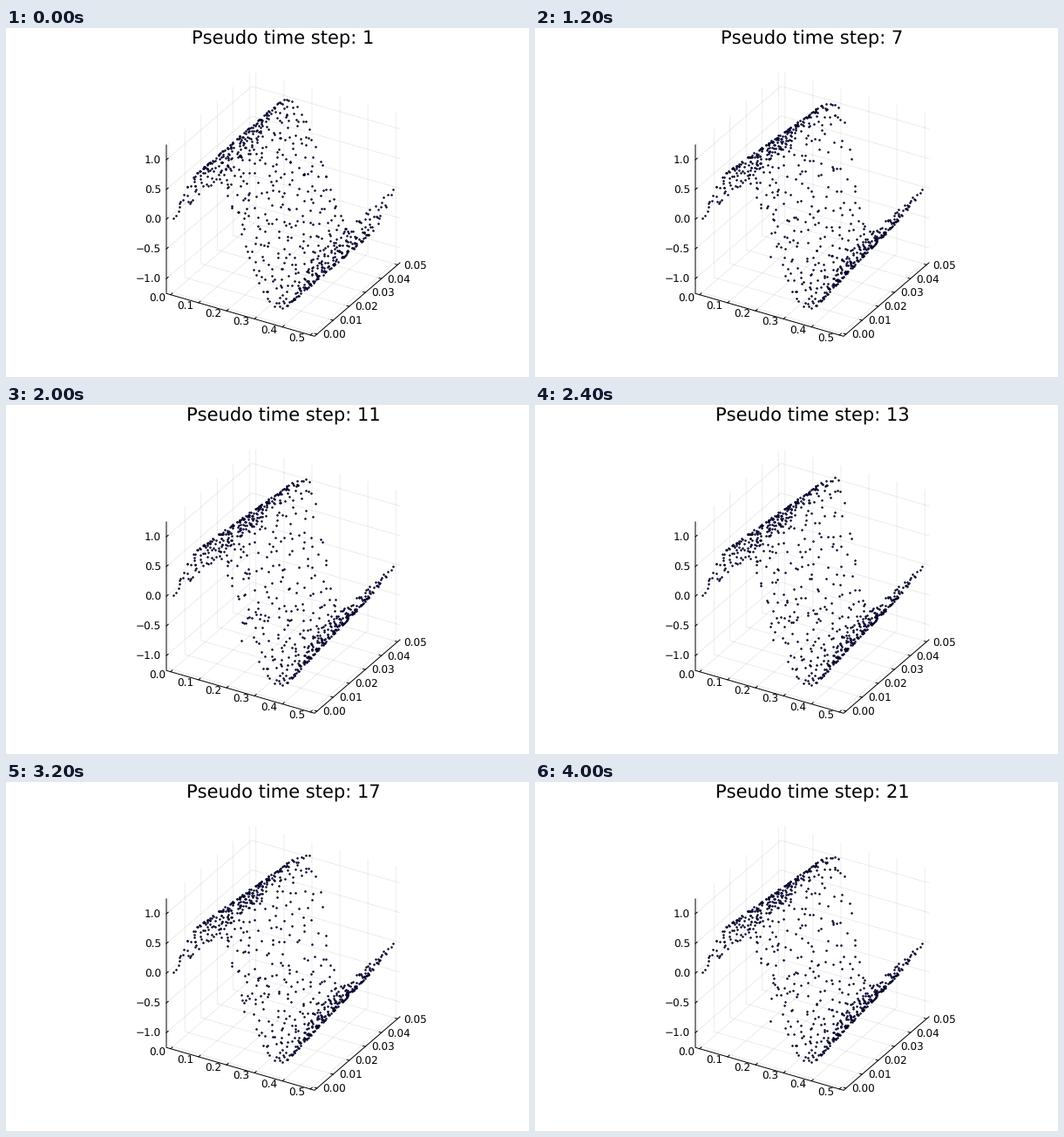
Write a matplotlib script that moves like this. It is 600 px wide and 400 px high and loops after 4200 ms.

```python
import numpy as np
import matplotlib.pyplot as plt
from matplotlib.animation import FuncAnimation

W, H, DPI = 600, 400, 100
PX = 72 / DPI
STEPS, INTERVAL = 21, 200
plt.rcParams["font.family"] = "DejaVu Sans"
plt.rcParams["text.hinting"] = "none"
plt.rcParams["text.hinting_factor"] = 1

X_LIM, T_LIM, U_LIM = (-0.015, 0.515), (-0.0015, 0.0515), (-1.25, 1.25)
ORIGIN = np.array([184.0, 304.3])
AXES = np.array([[170.0, 49.0], [98.0, -84.3], [0.0, -170.3]])


def project(x, t, u):
    """Orthographic projection of data coordinates to pixels."""
    parts = [(np.asarray(v, float) - lo) / (hi - lo)
             for v, (lo, hi) in zip((x, t, u), (X_LIM, T_LIM, U_LIM))]
    return ORIGIN + sum(p[..., None] * axis for p, axis in zip(parts, AXES))


def bump(v, center, width):
    return np.exp(-((v - center) / width) ** 2)


# Jittered cloud of space-time points
rng = np.random.default_rng(7)
gx, gt = np.meshgrid(np.linspace(0, 0.5, 54), np.linspace(0, 0.05, 13))
x = np.clip(gx + rng.uniform(-0.006, 0.006, gx.shape), 0, 0.5)
t = np.clip(gt + rng.uniform(-0.0025, 0.0025, gt.shape), 0, 0.05)
x[0, 0] = t[0, 0] = 0
x[-1, -1], t[-1, -1] = 0.5, 0.05
x, t = x.ravel(), t.ravel()
jitter = rng.normal(0, 0.13, x.size)
phase = rng.uniform(0, 2 * np.pi, x.size)

# Burgers solution by characteristics
foot = x.copy()
for _ in range(60):
    foot = x - t * np.sin(4 * np.pi * foot)
initial = np.sin(4 * np.pi * x)
solution = np.sin(4 * np.pi * foot)

near_start = np.exp(-t / 0.01)
drift = near_start * (0.3 * bump(x, 0.277, 0.016) - 0.45 * bump(x, 0.238, 0.014))
drift += 0.1 * bump(x, 0.195, 0.012) * (t / 0.05) ** 2


def surface(step):
    u = initial + (solution - initial) * (1 - 0.1 ** step)
    growth = np.clip((step - 2) / 8, 0, 1)
    wobble = jitter * bump(x, 0.25, 0.05) * np.sin(0.45 * step + phase)
    return u + growth * drift + min(step / 4, 1) * wobble


fig = plt.figure(figsize=(W / DPI, H / DPI), dpi=DPI, facecolor="white")
ax = fig.add_axes([0, 0, 1, 1])
ax.set(xlim=(0, W), ylim=(H, 0))
ax.axis("off")


def line(points, color="black", width=1.0, alpha=1.0):
    px, py = np.array([project(*p) for p in points]).T
    ax.plot(px, py, color=color, lw=width * PX, alpha=alpha, zorder=1)


def grid(points):
    line(points, width=0.7, alpha=0.1)


def label(pos, text, dx, dy, align):
    ax.text(pos[0] + dx, pos[1] + dy + 4.3, text, fontsize=11.9 * PX,
            ha=align, va="baseline")


(x0, x1), (t0, t1), (u0, u1) = X_LIM, T_LIM, U_LIM
for v in np.arange(6) / 10:
    grid([(v, t0, u0), (v, t1, u0), (v, t1, u1)])
    line([(v, t0, u0), (v, t0 + 0.0011, u0)])
    label(project(v, t0, u0), f"{v:.1f}", -5.7, 3.6, "right")
for v in np.arange(6) / 100:
    grid([(x1, v, u0), (x0, v, u0), (x0, v, u1)])
    line([(x1, v, u0), (x1 - 0.008, v, u0)])
    label(project(x1, v, u0), f"{v:.2f}", 6.7, 0.8, "left")
for v in np.arange(-2, 3) / 2:
    grid([(x0, t0, v), (x0, t1, v), (x1, t1, v)])
    line([(x0, t0, v), (x0, t0 + 0.0011, v)])
    label(project(x0, t0, v), f"{v:.1f}".replace("-", "\u2212"), -6.2, 0.6, "right")
line([(x0, t0, u1), (x0, t0, u0), (x1, t0, u0), (x1, t1, u0)])

title = ax.text(318, 18.6, "", fontsize=20.8 * PX, ha="center", va="baseline")
dots, = ax.plot([], [], "o", ms=1.65 * PX, mfc="blue", mec="black",
                mew=0.8 * PX, zorder=3)


def update(step):
    dots.set_data(*project(x, t, surface(step)).T)
    title.set_text(f"Pseudo time step: {step + 1}")
    return dots, title


anim = FuncAnimation(fig, update, frames=STEPS, interval=INTERVAL,
                     repeat=True, repeat_delay=0)
plt.show()
```
